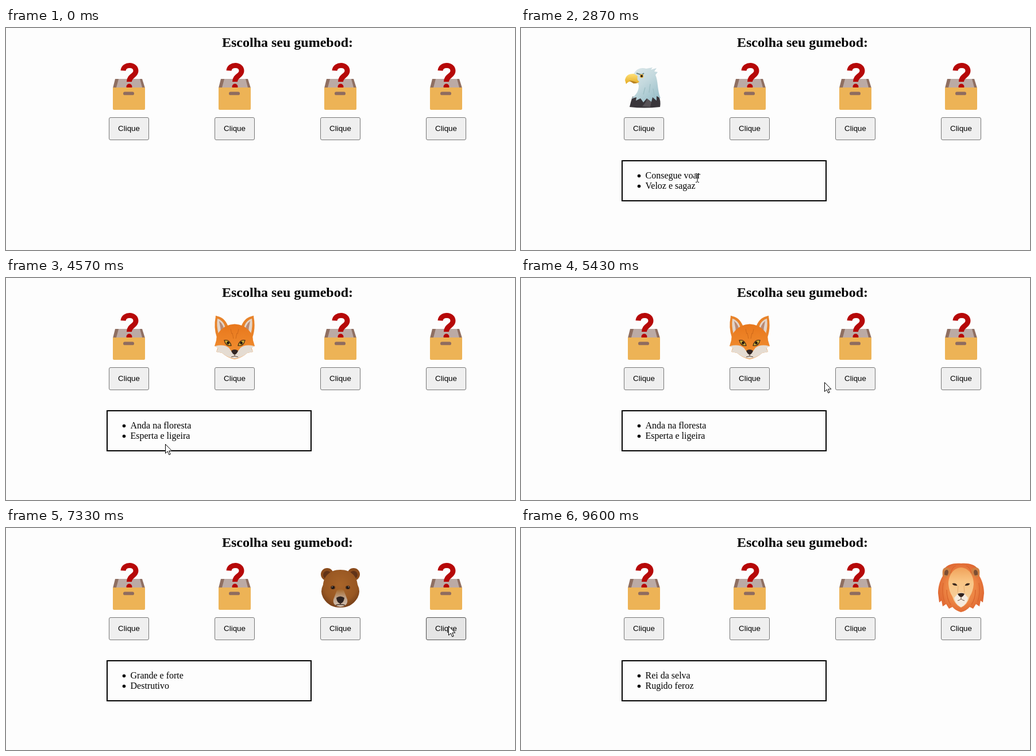
An HTML page for the animation above (9.63 s loop, 886x388 px).

```html
<!DOCTYPE html>
<html lang="pt">
<head>
<meta charset="utf-8">
<title>Caixas surpresa</title>
<style>
html, body { margin: 0; width: 100%; height: 100%; overflow: hidden; background: #fdfdfd; }
svg { display: block; }
.title { font: bold 24px "Liberation Serif", "Times New Roman", serif; }
.item { font: 16px "Liberation Serif", "Times New Roman", serif; }
.label { font: 13.333px "Liberation Sans", Arial, sans-serif; }
.btn rect { fill: #efefef; stroke: #767676; }
.btn.over rect { fill: #e5e5e5; stroke: #4f4f4f; }
</style>
</head>
<body>
<svg id="stage" width="886" height="388" viewBox="0 0 886 388">
<defs>
  <linearGradient id="plume" x2="0.7" y2="1">
    <stop offset="0" stop-color="#dfe9ea"/><stop offset=".5" stop-color="#c4d9de"/><stop offset="1" stop-color="#9cc1cb"/>
  </linearGradient>
  <linearGradient id="beak" x2="0" y2="1">
    <stop offset="0" stop-color="#ffe17a"/><stop offset="1" stop-color="#e3a920"/>
  </linearGradient>
  <linearGradient id="fur" x2="0" y2="1">
    <stop offset="0" stop-color="#e8771c"/><stop offset="1" stop-color="#f39335"/>
  </linearGradient>
  <radialGradient id="brown" cy=".4" r=".62">
    <stop offset="0" stop-color="#a9652a"/><stop offset=".7" stop-color="#985722"/><stop offset="1" stop-color="#733d18"/>
  </radialGradient>
  <linearGradient id="muzzle" x2="0" y2="1">
    <stop offset="0" stop-color="#a66729"/><stop offset=".5" stop-color="#c0a48c"/><stop offset="1" stop-color="#d0bfb0"/>
  </linearGradient>
  <radialGradient id="mane" r=".55">
    <stop offset="0" stop-color="#f2a055"/><stop offset=".6" stop-color="#ec8443"/><stop offset="1" stop-color="#de6430"/>
  </radialGradient>
  <linearGradient id="gold" x2="0" y2="1">
    <stop offset="0" stop-color="#f0a25a"/><stop offset=".35" stop-color="#f9c584"/><stop offset="1" stop-color="#f3d3a6"/>
  </linearGradient>

  <g id="box">
    <path d="M-24 89H23L28 105H-28Z" fill="#8f6f62"/>
    <path d="M-18 89H19L23 104H-22Z" fill="#bbaaa5"/>
    <path d="M-10 74.500C-9 62.500 12 62.500 12 75C12 84 .5 83 .5 94" fill="none" stroke="#b60808" stroke-width="9"/>
    <circle cx=".5" cy="102.500" r="5" fill="#b60808"/>
    <path d="M-28 104H28V141Q28 143 26 143H-26Q-28 143 -28 141Z" fill="#edb356"/>
    <rect x="-10" y="111.500" width="19" height="5.800" rx="2.900" fill="#8f6c5f"/>
  </g>

  <g id="eagle">
    <path d="M-20 120Q-23 129 -25 138Q0 141 28 138Q30 127 25 118Z" fill="#39353a"/>
    <path d="M-3 137Q5 129 6 121L13 129 11 138Z" fill="#575257"/>
    <path d="M-18 81C-14 72 -6 68 4 71L15 69 12 73 22 70 18 76 24 77 20 82C25 93 23 109 29 123L22 119 22 127 15 121 13 129 5 123 -1 130 -6 123 -14 127 -13 121 -23 124C-12 116 -9 109 -9 100Z" fill="url(#plume)"/>
    <path d="M2 104L-1 116M11 98L9 113M16 106L18 118" fill="none" stroke="#a0c0c6" stroke-width="1.500"/>
    <path d="M-17 80Q-31 79 -33 91L-31 98Q-25 90 -19 96Q-12 98 -8 94Q-13 91 -11 84Z" fill="url(#beak)"/>
    <path d="M-26 92Q-18 92 -11 96L-18 97Z" fill="#b98324"/>
    <path d="M-13 79L-4 82 0 79" fill="none" stroke="#6a8588" stroke-width="2"/>
    <circle cx="-4" cy="84" r="3.200" fill="#e9b238"/><circle cx="-4" cy="84" r="2" fill="#231c1a"/>
  </g>

  <g id="fox">
    <g id="foxSide">
      <path d="M-33 67Q-35 65 -29 67Q-16 70 -10 88L-31 104Q-37 87 -33 67Z" fill="#e8832a"/>
      <path d="M-30 71Q-17 75 -15 93L-28 98Q-32 84 -30 71Z" fill="#e2d4c8"/>
      <path d="M-27 75Q-18 82 -18 96L-24 98Q-24 87 -27 75Z" fill="#b98a74"/>
    </g>
    <use href="#foxSide" transform="scale(-1 1)"/>
    <path d="M-15 84Q0 77 15 84Q32 94 32 109L35 119 29 121 32 129 22 131Q12 140 0 142Q-12 140 -22 131L-32 129 -29 121 -35 119 -32 109Q-32 94 -15 84Z" fill="url(#fur)"/>
    <g id="foxCheek">
      <path d="M-34 119Q-19 115 -10 122L-5 129 0 131V141Q-13 139 -22 131L-32 129 -29 123Z" fill="#e5dcd2"/>
      <path d="M-18 109Q-9 107 -6 118Q-15 120 -18 109Z" fill="#d4b238" stroke="#513418" stroke-width="1.300"/>
      <circle cx="-11.500" cy="113.500" r="2.400" fill="#201712"/>
      <path d="M-5 98L-7 89M-2 106L-4 96" stroke="#d06a1a"/>
    </g>
    <use href="#foxCheek" transform="scale(-1 1)"/>
    <path d="M-6 127Q0 123 6 127Q4 133 0 134Q-4 133 -6 127Z" fill="#322522"/>
    <path d="M0 133V137M-6 138Q0 135 6 138" fill="none" stroke="#554338"/>
  </g>

  <g id="bear">
    <g id="bearSide">
      <circle cx="-23" cy="81" r="11" fill="#8a4b1c"/>
      <circle cx="-23" cy="82" r="7" fill="#613318"/>
    </g>
    <use href="#bearSide" transform="scale(-1 1)"/>
    <path d="M0 73C20 73 29 86 30 99Q36 111 30 122C22 135 12 139 0 139C-12 139 -22 135 -30 122Q-36 111 -30 99C-29 86 -20 73 0 73Z" fill="url(#brown)"/>
    <path d="M-6 109Q0 105 6 109L12 125Q14 136 0 138Q-14 136 -12 125Z" fill="url(#muzzle)"/>
    <g id="bearEye">
      <ellipse cx="-13" cy="104" rx="4" ry="3.300" fill="#52301a"/><circle cx="-13" cy="104" r="2.300" fill="#171212"/>
      <circle cx="-14" cy="103" r=".7" fill="#ddd"/>
    </g>
    <use href="#bearEye" transform="scale(-1 1)"/>
    <path d="M-7 122Q0 117 7 122Q6 131 0 132Q-6 131 -7 122Z" fill="#2d2220"/>
    <path d="M0 131V134M-8 135Q0 132 8 135" fill="none" stroke="#3d2a20" stroke-width="1.500"/>
  </g>

  <g id="lion">
    <path d="M0 62C14 61 23 64 28 70Q33 76 32 84C38 94 40 105 40 114L38 130 34 127 32 137 26 133 21 141 15 138Q9 145 0 147Q-9 145 -15 138L-21 141 -26 133 -32 137 -34 127 -38 130 -40 114C-40 105 -38 94 -32 84Q-33 76 -28 70C-23 64 -14 61 0 62Z" fill="url(#mane)"/>
    <g id="lionSide">
      <path d="M-32 82Q-34 69 -25 69Q-17 69 -18 80L-27 87Z" fill="#cf8043"/>
      <path d="M-29 82Q-30 73 -24 73Q-20 76 -24 83Z" fill="#7b4e34"/>
      <path d="M-31 96Q-34 113 -29 129M-25 108Q-25 124 -18 134M-9 66Q-16 69 -18 79" fill="none" stroke="#d9652d" stroke-width="1.300"/>
    </g>
    <use href="#lionSide" transform="scale(-1 1)"/>
    <path d="M0 69C14 70 22 83 22 98Q21 111 15 120Q11 134 0 139Q-11 134 -15 120Q-21 111 -22 98C-22 83 -14 70 0 69Z" fill="url(#gold)"/>
    <path d="M-6 115Q0 111 6 115L12 122Q10 134 0 138Q-10 134 -12 122Z" fill="#f5ebdf"/>
    <g id="lionEye">
      <path d="M-15.500 97Q-9 95 -6.500 100.500Q-13 102 -15.500 97Z" fill="#3b291d"/>
      <path d="M-5 101L-6 113" stroke="#e3ac6c"/>
    </g>
    <use href="#lionEye" transform="scale(-1 1)"/>
    <path d="M-6 115Q0 112.500 6 115Q4 120 0 121Q-4 120 -6 115Z" fill="#30231f"/>
    <path d="M0 120V124M-6 127Q-2 126 0 124Q2 126 6 127" fill="none" stroke="#6b5040"/>
  </g>
</defs>

<text class="title" x="490" y="33" text-anchor="middle">Escolha seu gumebod:</text>
<g id="slots"></g>
<g id="panel" visibility="hidden">
  <rect x="176" y="232" width="355" height="70" fill="none" stroke="#000" stroke-width="2"/>
  <circle cx="205.500" cy="258.500" r="2.800"/><circle cx="205.500" cy="276.500" r="2.800"/>
  <text class="item" x="216.500" y="263"></text>
  <text class="item" x="216.500" y="281"></text>
</g>
<path id="arrow" d="M.5 .5V16.500L4.200 13 6.800 19 9.200 18 6.700 12.200H11.800Z" fill="#fff" stroke="#000"/>
<path id="beam" d="M-3 -7.500H-1L0 -6.500 1 -7.500H3M0 -6.500V6.500M-3 7.500H-1L0 6.500 1 7.500H3" fill="none" stroke="#000"/>
</svg>
<script>
const LOOP = 9630;
const centers = [214, 398, 582, 766];
const animals = [
  { id: 'eagle', at: 1900, lines: ['Consegue voar', 'Veloz e sagaz'] },
  { id: 'fox', at: 3560, lines: ['Anda na floresta', 'Esperta e ligeira'] },
  { id: 'bear', at: 5820, lines: ['Grande e forte', 'Destrutivo'] },
  { id: 'lion', at: 7500, lines: ['Rei da selva', 'Rugido feroz'] }
];
// Pointer stops: time, x, y
const path = [
  [30, -16, 262], [120, 0, 257], [500, 4, 233], [670, 4, 233],
  [1550, 218, 174], [2000, 218, 174], [2600, 307, 262], [3000, 307, 262],
  [3420, 392, 176], [3680, 392, 176], [4250, 277, 290], [4950, 277, 290],
  [5430, 528, 182], [5600, 578, 176], [5940, 578, 176], [6400, 290, 276],
  [6750, 290, 276], [7280, 770, 171], [7640, 770, 171], [8200, 290, 281],
  [8600, 300, 257], [8850, 300, 257], [9300, 520, 40], [9500, 545, -22]
];

const byId = id => document.getElementById(id);
const show = (el, on) => el.setAttribute('visibility', on ? 'visible' : 'hidden');

byId('slots').innerHTML = centers.map(x => `
  <g transform="translate(${x})">
    <use class="pic" href="#box"/>
    <g class="btn"><rect x="-34.500" y="156.500" width="69" height="39" rx="2.500"/>
    <text class="label" y="180" text-anchor="middle">Clique</text></g>
  </g>`).join('');
const pics = document.querySelectorAll('.pic');
const buttons = document.querySelectorAll('.btn');
const items = document.querySelectorAll('.item');
const panel = byId('panel'), arrow = byId('arrow'), beam = byId('beam');

function pointerAt(t) {
  const i = path.findIndex(p => p[0] > t);
  if (i < 1) return null;
  const [t0, x0, y0] = path[i - 1], [t1, x1, y1] = path[i];
  const u = (t - t0) / (t1 - t0), k = u * u * (3 - 2 * u);
  return { x: Math.round(x0 + (x1 - x0) * k), y: Math.round(y0 + (y1 - y0) * k) };
}

let shown = -1;
function choose(n) {
  if (n === shown) return;
  shown = n;
  pics.forEach((pic, i) => pic.setAttribute('href', i === n ? '#' + animals[n].id : '#box'));
  show(panel, n >= 0);
  items.forEach((item, i) => { item.textContent = n < 0 ? '' : animals[n].lines[i]; });
}

function draw(t) {
  choose(animals.filter(a => t >= a.at).length - 1);
  const p = pointerAt(t);
  const onText = p && shown >= 0 && p.x > 216 && p.x < 325 && p.y > 248 && p.y < 285;
  show(arrow, p && !onText);
  show(beam, onText);
  if (p) {
    arrow.setAttribute('transform', `translate(${p.x} ${p.y})`);
    beam.setAttribute('transform', `translate(${p.x} ${p.y})`);
  }
  buttons.forEach((b, i) => b.classList.toggle('over',
    !!p && Math.abs(p.x - centers[i]) < 35 && p.y >= 156 && p.y < 196));
}

const start = performance.now();
function tick() {
  draw((performance.now() - start) % LOOP);
  requestAnimationFrame(tick);
}
tick();
</script>
</body>
</html>
```
